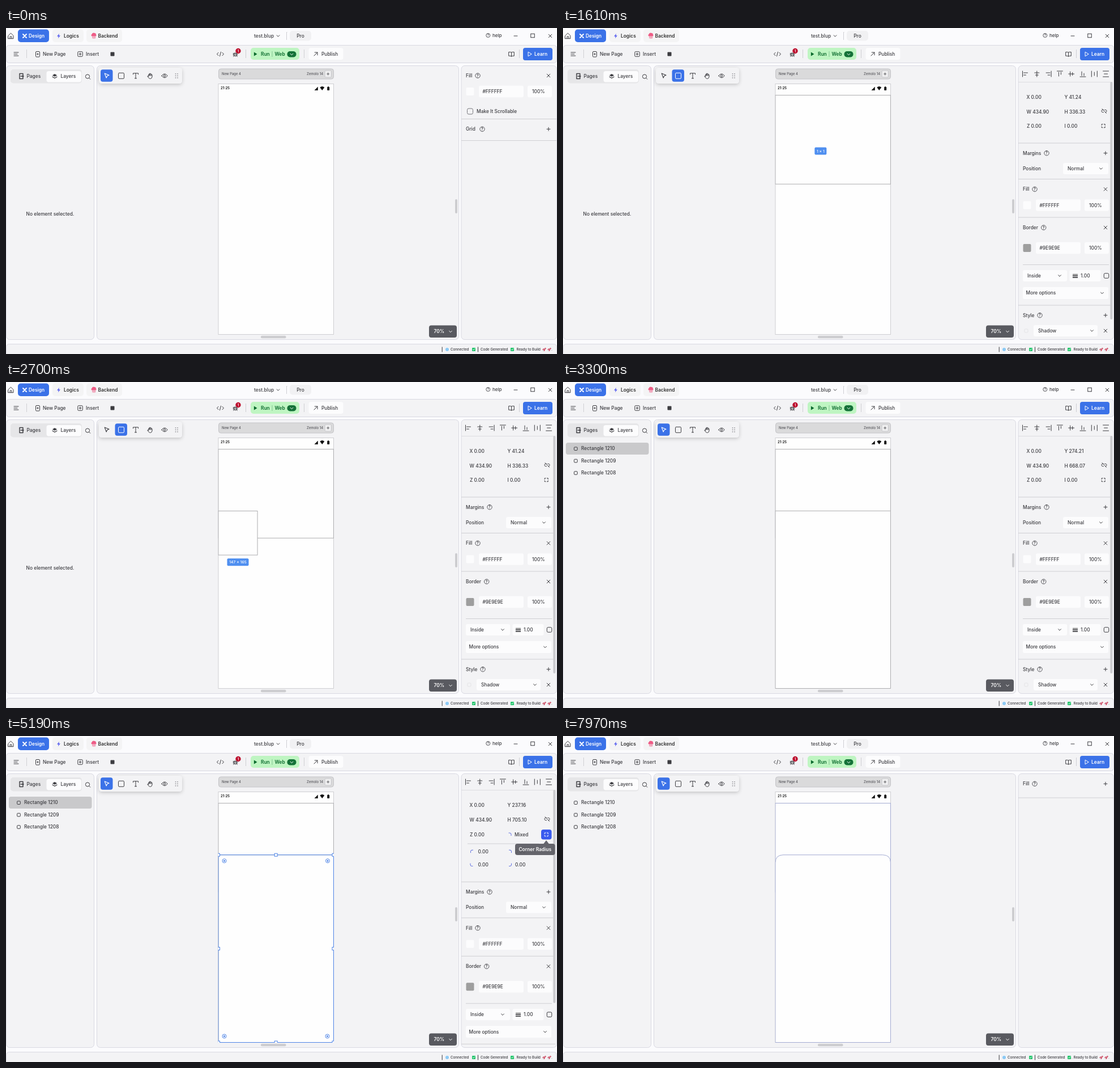
An HTML page for the animation above (8000 ms loop, 973 by 575 pixels).

```html
<!DOCTYPE html>
<html lang="en">
<head>
<meta charset="utf-8">
<title>Interface builder</title>
<style>
html, body { margin: 0; width: 100%; height: 100%; overflow: hidden; background: #fbfbfd; }
svg { display: block; }
text { font-family: Inter, Roboto, sans-serif; white-space: pre; }
</style>
</head>
<body>
<svg id="stage" width="973" height="575" viewBox="0 0 973 575">
  <defs>
    <clipPath id="phoneClip"><rect x="374.5" y="98" width="204.5" height="443"/></clipPath>
    <clipPath id="sideClip"><rect x="804" y="67" width="168" height="482"/></clipPath>
    <filter id="soft" x="-10%" y="-30%" width="120%" height="180%">
      <feDropShadow dx="0" dy="2" stdDeviation="3" flood-color="#000" flood-opacity=".2"/>
    </filter>
  </defs>
  <g id="base"></g><g id="live"></g>
</svg>
<script>
const LOOP = 8000, SCALE = 0.468;
const INK = '#3c3c40', BLUE = '#3b72e8', LINE = '#cfcfd3', PANEL = '#f3f3f5', EDGE = '#d9d9e2', WHITE = '#fcfcfd';

const text = (x, y, s, { size = 8.4, weight = 500, fill = INK, anchor = 'start' } = {}) =>
  `<text x="${x}" y="${y + size * 0.365}" font-size="${size}" font-weight="${weight}" fill="${fill}" text-anchor="${anchor}">${s}</text>`;
const box = (x, y, w, h, fill = WHITE, r = 3, stroke = 'none', extra = '') =>
  `<rect x="${x}" y="${y}" width="${w}" height="${h}" rx="${r}" fill="${fill}" stroke="${stroke}" ${extra}/>`;
const icon = (x, y, d, { stroke = INK, fill = 'none', width = 1 } = {}) =>
  `<path transform="translate(${x} ${y})" d="${d}" fill="${fill}" stroke="${stroke}" stroke-width="${width}" stroke-linecap="round" stroke-linejoin="round"/>`;
const dot = (x, y, r, fill, stroke = 'none') => `<circle cx="${x}" cy="${y}" r="${r}" fill="${fill}" stroke="${stroke}"/>`;
const solid = fill => ({ fill, stroke: 'none' });
const rule = (x, y, w, color = LINE) => box(x, y, w, 1, color, 0);
const chevron = (x, y, stroke = INK) => icon(x, y, 'M-2.4-1.2L0 1.2 2.4-1.2', { stroke });
const plus = (x, y) => icon(x, y, 'M-3 0H3M0-3V3');
const cross = (x, y) => icon(x, y, 'M-2.8-2.8L2.8 2.8M2.8-2.8L-2.8 2.8');
const help = (x, y, r = 4.2) => dot(x, y, r, 'none', '#55555a') + text(x, y, '?', { size: r * 1.65, weight: 600, anchor: 'middle' });
const square = (x, y, s, stroke = INK, r = 1.5) => box(x - s / 2, y - s / 2, s, s, 'none', r, stroke);
const tick = x => box(x - 3, 564, 6, 6, '#20c46a', 1) + icon(x, 567, 'M-1.6 0L-.4 1.2 1.7-1.3', { stroke: '#fff', width: .9 });
const rocket = x => icon(x, 567, 'M-3 3L-1.5-.8Q.5-3 3-3 3-.5.8 1.5Z', solid('#c9ccd4')) +
  icon(x, 567, 'M-2.4.2L-.6-1M-.2 2.4L1-.6M1.8-2.3L2.5-1.6', { stroke: '#d8324c', width: 1.4 });

function titleBar() {
  const dark = { weight: 600, fill: '#333' };
  return icon(8.5, 14, 'M-4.5-.5L0-5 4.5-.5V4.7H-4.5ZM-1.4 4.5V1H1.4V4.5') +
    box(21, 2.5, 55, 22.5, BLUE, 5) + icon(33, 14, 'M-3-3L3 3M3-3L-3 3', { stroke: '#fff', width: 1.9 }) +
    text(40, 13.8, 'Design', { weight: 600, fill: '#fff' }) +
    box(82, 2.5, 55, 22.5, '#f4f4f5', 5) + icon(93, 14, 'M1-4.2L-3 .7H-.4L-1 4.2 3-.7H.4Z', solid('#5b62f0')) + text(102, 13.8, 'Logics', dark) +
    box(142, 2.5, 63, 22.5, '#f4f4f5', 5) +
    icon(155, 12.5, 'M-3.6 2Q-5.6 0-3.4-1.5-2.6-4.8.6-3.8 4-3.8 3.9-1 5.4.8 3.6 2Z', solid('#ee5c86')) +
    icon(155, 16, 'M-2-1V2M.2-1V2.6M2.3-1V2', { stroke: '#ee5c86' }) + text(162.5, 13.8, 'Backend', dark) +
    text(438, 13.8, 'test.blup') + chevron(480.5, 14) + rule(495.5, 7, 1) + box(495, 7, 1, 14, LINE, 0) +
    box(501, 5, 38, 17.5, '#f1f1f3', 5) + text(520, 13.8, 'Pro', { anchor: 'middle' }) +
    help(851.3, 13, 3.5) + text(859, 12.8, 'help', { size: 8 }) +
    icon(900, 14, 'M-3 0H3') + square(930, 13.5, 6.5, INK, 0) + cross(961, 14);
}

function toolBar() {
  const green = '#0b6a2d';
  return box(.5, 30.5, 972, 31, PANEL, 5, EDGE) +
    icon(18, 46, 'M-4-3H4M-4 0H2M-4 3H4') + box(36, 38, 1, 15, LINE, 0) +
    box(52.5, 41.5, 7, 9.5, 'none', 1.5, INK) + icon(56, 46, 'M-1.4 0H1.4M0-1.4V1.4') + text(65, 46, 'New Page') +
    square(131, 46, 8.5) + icon(131, 46, 'M-2 0H2M0-2V2') + text(141, 46, 'Insert') + box(184.5, 42.5, 7, 7, INK, 1) +
    icon(378.5, 46, 'M-3.4-2.7L-6 0-3.4 2.7M3.4-2.7L6 0 3.4 2.7M1-3.8L-1 3.8') +
    icon(405, 46.5, 'M-2.4-2H2.4V2Q0 5-2.4 2ZM-4-1.5H4M-4 1H4M-3.6 3.8L-2 2.4M3.6 3.8L2 2.4M-1-2Q0-4 1-2') +
    dot(410, 40.5, 4.7, '#bd1230') + text(410, 40.5, '1', { size: 6.5, fill: '#fff', anchor: 'middle' }) +
    box(423, 38, 1, 15, LINE, 0) + box(432, 35, 86, 21, '#bff5c2', 5) +
    icon(440.5, 46, 'M-2.6-3.4L3 0-2.6 3.4Z', solid(green)) + text(450, 46, 'Run', { weight: 600, fill: green }) +
    box(469.5, 41, 1, 10, '#86c893', 0) + text(474.5, 46, 'Web', { weight: 600, fill: green }) +
    box(496.5, 41, 16, 10.5, '#147238', 5) + chevron(504.5, 46.5, '#fff') +
    box(526, 38, 1, 15, LINE, 0) + box(534.5, 35, 61, 21, WHITE, 4) +
    icon(547, 46, 'M-3 3L3-3M-1.8-3H3V1.8') + text(557, 46, 'Publish') +
    icon(892.5, 46, 'M0-3Q-2-4-4.8-3.5V3.2Q-2 3 0 4 2 3 4.8 3.2V-3.5Q2-4 0-3V4') +
    box(906, 38, 1, 15, LINE, 0) + box(913, 35, 52, 22, BLUE, 4) +
    icon(925, 46, 'M-2.6-3.6L3.2 0-2.6 3.6Z', { stroke: '#fff' }) + text(933, 46, 'Learn', { weight: 600, fill: '#fff' });
}

function panels() {
  const small = { size: 5.9, fill: '#55555a' }, foot = { size: 6.2 };
  return box(.5, 66.5, 155, 483, PANEL, 6, EDGE) + box(160.5, 66.5, 639, 483, PANEL, 6, EDGE) +
    box(804, 66.5, 168.5, 483, PANEL, 6, EDGE) + box(.5, 557.5, 972, 20, PANEL, 5, EDGE) +
    box(8, 73, 126, 24.5, '#e6e6e8', 5) + box(71.5, 76, 61.5, 19.5, WHITE, 4) +
    icon(27, 85, 'M-3-4.5H3V-2M3 2V4.5H-3V-4.5M-1 0H4M2.5-1.5L4 0 2.5 1.5', { width: 1.4 }) + text(36.5, 85.3, 'Pages') +
    icon(86, 85, 'M0-4L4.2-1.6 0 .8-4.2-1.6Z', solid(INK)) + icon(86, 85, 'M-4 1L0 3.4 4 1', { width: 1.2 }) + text(96.5, 85.3, 'Layers') +
    dot(144, 85.5, 3.6, 'none', INK) + icon(147, 88.5, 'M0 0L1.8 1.8') +
    box(375.5, 72, 203, 18, '#dadadb', 4, '#c4c4c8') + text(381, 81.2, 'New Page 4', small) +
    text(560, 81.2, 'Zemolo 14', { ...small, anchor: 'end' }) + box(563, 75, 11.5, 12, '#eeeeef', 2, '#c8c8cc') + icon(568.7, 81, 'M-2 0H2M0-2V2', { width: .8 }) +
    box(375, 98.5, 203.5, 442, '#fefefe', 0, '#cfcfd2') + text(379, 106, '21:25', { size: 6.2, weight: 600, fill: '#111' }) +
    icon(548, 107, 'M-3.5 3H2.8V-3.4Z', solid('#111')) + icon(558.3, 106.5, 'M-4-1.8Q0-5 4-1.8L0 3.4Z', solid('#111')) +
    box(567.2, 104, 4, 6, '#111', .7) + box(568.3, 103.2, 1.8, 1, '#111', 0) +
    box(450, 542.7, 44.5, 4.6, '#cdcdd0', 2) + box(793, 302, 4, 25, '#cdcdd0', 2) +
    box(747, 524.5, 49, 21.5, '#595a60', 4) + text(755.5, 535, '70%', { weight: 600, fill: '#fff' }) + chevron(785, 535.5, '#fff') +
    box(769.7, 562.5, 1, 9, INK, 0) + dot(779, 567, 3, '#8ccaf5') + text(785, 567, 'Connected', foot) + tick(826) +
    box(833, 562.5, 1, 9, INK, 0) + text(838, 567, 'Code Generated', foot) + tick(894) + text(898, 567, '. Ready to Build', foot) +
    rocket(950.5) + rocket(959.5) + text(963, 567, '.', foot);
}

function tools(rectActive) {
  const tint = on => ({ stroke: on ? '#fff' : INK });
  return box(164, 70, 147, 28, PANEL, 5, 'none', 'filter="url(#soft)"') + box(rectActive ? 192.5 : 167, 73.3, 21.5, 21.5, BLUE, 4) +
    icon(178, 84, 'M-3.8-4L4-.8.7.6-.8 4Z', { ...tint(!rectActive), width: 1.1 }) +
    square(203.5, 84.3, 10, rectActive ? '#fff' : INK, 1.5) +
    icon(229, 84.3, 'M-4.5-2.5V-4.5H4.5V-2.5M0-4.5V4.5M-1.6 4.5H1.6') +
    icon(254.5, 84.5, 'M-2.8 1V-2.5Q-2-3.8-1.3-2.5V-.5M-1.3-1V-4Q-.5-5.2.3-4V-.5M.3-3.7Q1.2-4.8 1.9-3.5V-.3M1.9-2.2Q3-3.2 3.6-2V1.5Q3 5 0 5-2 5-4.8.6-4.4-.6-2.8 1') +
    icon(280, 84.3, 'M-5.2 0Q0-7 5.2 0 0 7-5.2 0Z') + dot(280, 84.3, 1.7, 'none', INK) +
    [-3.5, 0, 3.5].map(dy => dot(299.5, 84.3 + dy, .9, '#8c8c90') + dot(303, 84.3 + dy, .9, '#8c8c90')).join('');
}

function layers(shown, selected) {
  if (!shown) return text(78, 327.8, 'No element selected.', { anchor: 'middle' });
  return (selected ? box(5, 107, 146.5, 21, '#c9c9cb', 4) : '') + [1210, 1209, 1208].map((n, i) =>
    square(22.5, 117.7 + i * 21.4, 5.6, INK, 1) + text(32, 117.4 + i * 21.4, 'Rectangle ' + n)).join('');
}

const heading = (s, y, qx, mark = cross) => text(812, y, s) + help(qx, y) + mark(958, y);
const swatchRow = (y, hex, color) => box(812.5, y - 7, 14, 14, color, 2) + box(835, y - 10.3, 79, 20.6) +
  text(841.5, y, hex) + box(921, y - 10.3, 43, 20.6) + text(929, y, '100%');
const select = (x, y, w, s, tx) => box(x, y - 10, w, 20) + text(tx, y, s) + chevron(x + w - 13, y);

function pageProps() {
  return heading('Fill', 84, 833) + swatchRow(112, '#FFFFFF', WHITE) +
    square(819.5, 147, 10, '#77777c', 2.5) + text(831, 147, 'Make It Scrollable') +
    rule(804, 160, 168) + heading('Grid', 178.3, 841, plus) + rule(804, 198, 168);
}

const emptyProps = () => heading('Fill', 84.3, 833, plus) + rule(804, 108.5, 168);

function alignIcons() {
  const shapes = ['M-5-5V5M-3-2H4M-3 2H1', 'M0-5V5M-4-2H4M-2.5 2H2.5', 'M5-5V5M3-2H-4M3 2H-1', 'M-5-5H5M-2-3V4M2-3V1',
    'M-5 0H5M-2-4V4M2-2.5V2.5', 'M-5 5H5M-2 3V-4M2 3V-1', 'M-5-5V5M5-5V5M0-3V3', 'M-5-5H5M-5 5H5M-3 0H3'];
  return shapes.map((d, i) => icon(816.5 + i * 20.3, 81, d)).join('');
}

const cornerIcon = (x, y, sx, sy) => icon(x, y, `M${-2.5 * sx} ${2 * sy}V0Q${-2.5 * sx} ${-2.5 * sy} 0 ${-2.5 * sy}H${1.5 * sx}`, { stroke: '#5b6be0' });

function tip(x, y, w, s, apex, opacity = 1) {
  return `<g opacity="${opacity}">` + icon(apex, y, 'M-5 .5L0-6 5 .5Z', solid('#5a5a61')) + box(x, y, w, 20, '#5a5a61', 4) +
    text(x + w / 2, y + 10, s, { weight: 600, fill: '#fff', anchor: 'middle' }) + '</g>';
}

function cornerFields(t) {
  const typed = (a, b) => t < a ? '0.00' : t < b ? '3' : '30';
  const ring = (x, on) => box(x, 195, 61.5, 18, WHITE, 4, on ? '#8b9cf0' : '#d5d7e6');
  let out = rule(815, 189.5, 126) + cornerIcon(889.5, 173.5, -1, 1) + text(898, 173.7, 'Mixed') +
    box(945, 165, 18.5, 17.5, '#3a5bee', 4);
  if (t > 5650 && t < 6900) out += ring(814.5, true);
  if (t > 6480) out += ring(880, t > 6900);
  out += cornerIcon(823, 203.7, 1, 1) + text(833.5, 203.7, typed(5950, 6150)) +
    cornerIcon(890, 203.7, -1, 1) + text(899, 203.7, typed(7100, 7260)) +
    cornerIcon(822.5, 227, 1, -1) + text(833.5, 227, '0.00') + cornerIcon(890, 227, -1, -1) + text(899, 227, '0.00');
  return out;
}

function cornerTips(t) {
  if (t < 5350) return tip(899, 190, 70.5, 'Corner Radius', 954, .92);
  if (t > 5550 && t < 6050) return tip(807, 221, 112, 'Top Left Corner Radius', 845);
  if (t > 6480 && t < 7050) return tip(855, 221, 111.5, 'Top Right Corner Radius', 910.5);
  return '';
}

function shapeProps(t, y, h) {
  const open = t >= 4850, d = open ? 54.3 : 0, rowZ = open ? 173.8 : 172.7;
  const lower = rule(804, 202.5, 166) + heading('Margins', 220.7, 854, plus) + text(812, 248, 'Position') + select(883, 248, 80, 'Normal', 891) +
    rule(804, 266, 166) + heading('Fill', 284.3, 833) + swatchRow(312.5, '#FFFFFF', WHITE) +
    rule(804, 333.5, 166) + heading('Border', 352, 848.7) + swatchRow(388, '#9E9E9E', '#9e9e9e') +
    rule(812, 417, 152) + select(812, 437, 78, 'Inside', 820) + box(894.5, 427, 55, 20) +
    [[-3, .8], [-.6, 1.5], [2.3, 2]].map(([dy, s]) => rule(900, 437 + dy, 9, '#444')).join('') +
    icon(904.5, 437, 'M-4 0H4M-4 3H4', { width: 1.5 }) + text(914, 437, '1.00') + square(959.5, 437, 8.5, INK, 2) +
    box(812, 457, 151, 21) + text(817.5, 467.3, 'More options') + chevron(952, 467.5) +
    rule(804, 488.5, 166) + heading('Style', 506.7, 842, plus) + square(818, 534, 6, '#e3e3e5') + box(831, 524, 113, 20) +
    text(839, 533.6, 'Shadow') + chevron(934, 534) + cross(958, 534);
  return `<g clip-path="url(#sideClip)">` + alignIcons() + rule(804, 95, 166, '#dcdce0') +
    text(818.5, 122, 'X 0.00') + text(885.5, 122, 'Y ' + y) + text(818.5, 147.5, 'W 434.90') + text(885.5, 147.5, 'H ' + h) +
    icon(955.5, 146.5, 'M-1-2.2H-2.5Q-4.6-2-4.6 0-4.5 2-2.5 2.2H-1M1-2.2H2.5Q4.6-2 4.6 0 4.5 2 2.5 2.2M-3.5-4L4 4', { width: .9 }) +
    text(819, rowZ, 'Z 0.00') + (open ? cornerFields(t) : text(885.5, rowZ, 'I 0.00')) +
    icon(954.2, rowZ, 'M-3-1.2V-3H-1.2M1.2-3H3V-1.2M3 1.2V3H1.2M-1.2 3H-3V1.2', { stroke: open ? '#fff' : INK }) +
    `<g transform="translate(0 ${d})">${lower}</g>` + box(966.3, 95, 4, open ? 376 : 419, '#cacace', 2) + (open ? cornerTips(t) : '') + '</g>';
}

// Linear interpolation over rows of [time, ...values].
function along(rows, t) {
  const i = rows.findIndex(row => row[0] > t);
  if (i < 0) return rows[rows.length - 1].slice(1);
  if (!i) return rows[0].slice(1);
  const [a, b] = [rows[i - 1], rows[i]], k = (t - a[0]) / (b[0] - a[0]);
  return a.slice(1).map((v, n) => v + (b[n + 1] - v) * k);
}

const FIRST = [[700, 375, 118.5], [900, 440, 165], [1100, 535, 235], [1300, 578.5, 275.3]];
const SECOND = [[2420, 375, 227.5], [2700, 443.6, 304.4], [3000, 578.5, 540.5]];
const HOVER = [[1350, 560, 270], [1610, 455, 204.5], [1800, 430, 200], [2300, 375, 227]];
const TOP = [[3300, 227.5], [3650, 179], [3870, 179], [4030, 187.3], [4250, 209.7]];

function sizeTag(x, y, w, h) {
  const s = `${Math.max(1, Math.floor(w / SCALE))} × ${Math.max(1, Math.floor(h / SCALE))}`, tagW = 4.25 * s.length - .25;
  return box(x - tagW / 2, y + 6, tagW, 13, '#4f8ff0', 2) + text(x, y + 12.7, s, { size: 6.8, fill: '#fff', anchor: 'middle' });
}

function rounded(top, left, right, stroke) {
  return `<path d="M375 ${top + left}Q375 ${top} ${375 + left} ${top}H${578.5 - right}Q578.5 ${top} 578.5 ${top + right}V540.5H375Z" fill="#fefefe" stroke="${stroke}"/>`;
}

function handles(top, left, right) {
  const inset = r => Math.max(10.5, r + .5), blue = '#4e84e6';
  const grip = (x, y) => box(x - 2.5, y - 2.5, 5, 5, '#fff', 0, blue);
  const knob = (x, y) => dot(x, y, 3.5, '#fff', blue) + dot(x, y, 1.5, blue);
  const mid = (top + 540.5) / 2, a = inset(left), b = inset(right);
  return box(375, top, 203.5, 540.5 - top, 'none', 0, blue) +
    [top, mid, 540.5].map(y => grip(375, y) + grip(578.5, y)).join('') + grip(476.7, top) + grip(476.7, 540.5) +
    knob(375 + a, top + a) + knob(578.5 - b, top + b) + knob(385.5, 529.5) + knob(567.5, 529.5);
}

function artboard(t) {
  let shapes = '', tag = '';
  const grey = '#adadb0', idle = '#a3abd2';
  const draw = (rows, y) => {
    const [x2, y2] = along(rows, t), w = x2 - 375, h = y2 - y;
    shapes += box(375, y, w, h, '#fefefe', 0, grey);
    return [375 + w / 2, y2, w, h];
  };
  if (t >= 700) {
    const first = draw(FIRST, 118.5);
    if (t < 1320) tag = sizeTag(...first);
  }
  if (t >= 1350 && t < 2420) tag = sizeTag(...along(HOVER, t), 0, 0);
  if (t >= 7600) shapes = box(375, 118.5, 203.5, 157, '#fefefe', 0, idle);
  if (t >= 2420 && t < 3050) tag = sizeTag(...draw(SECOND, 227.5));
  if (t >= 3050) {
    const [top] = along(TOP, t);
    const left = t < 5950 ? 0 : t < 6150 ? 1.4 : 14, right = t < 7100 ? 0 : t < 7260 ? 1.4 : 14;
    shapes += rounded(top, left, right, t >= 7600 ? idle : grey);
    if (t < 3300 || (t >= 3700 && t < 3870) || (t >= 4250 && t < 7600)) shapes += handles(top, left, right);
  }
  return `<g clip-path="url(#phoneClip)">${shapes}</g>${tag}`;
}

function properties(t) {
  if (t < 1330) return pageProps();
  if (t >= 7600) return emptyProps();
  const [y, h] = t < 3050 ? ['41.24', '336.33'] : t < 3700 ? ['274.21', '668.07'] : t < 4250 ? ['171.67', '770.61'] : ['237.16', '705.10'];
  return shapeProps(t, y, h);
}

const base = document.getElementById('base'), live = document.getElementById('live');
base.innerHTML = titleBar() + toolBar() + panels();
let last = '';
function render() {
  const t = performance.now() % LOOP;
  const next = tools(t >= 450 && t < 3050) + layers(t >= 3050, t < 7600) + artboard(t) + properties(t);
  if (next !== last) live.innerHTML = last = next;
  requestAnimationFrame(render);
}
render();
</script>
</body>
</html>
```
